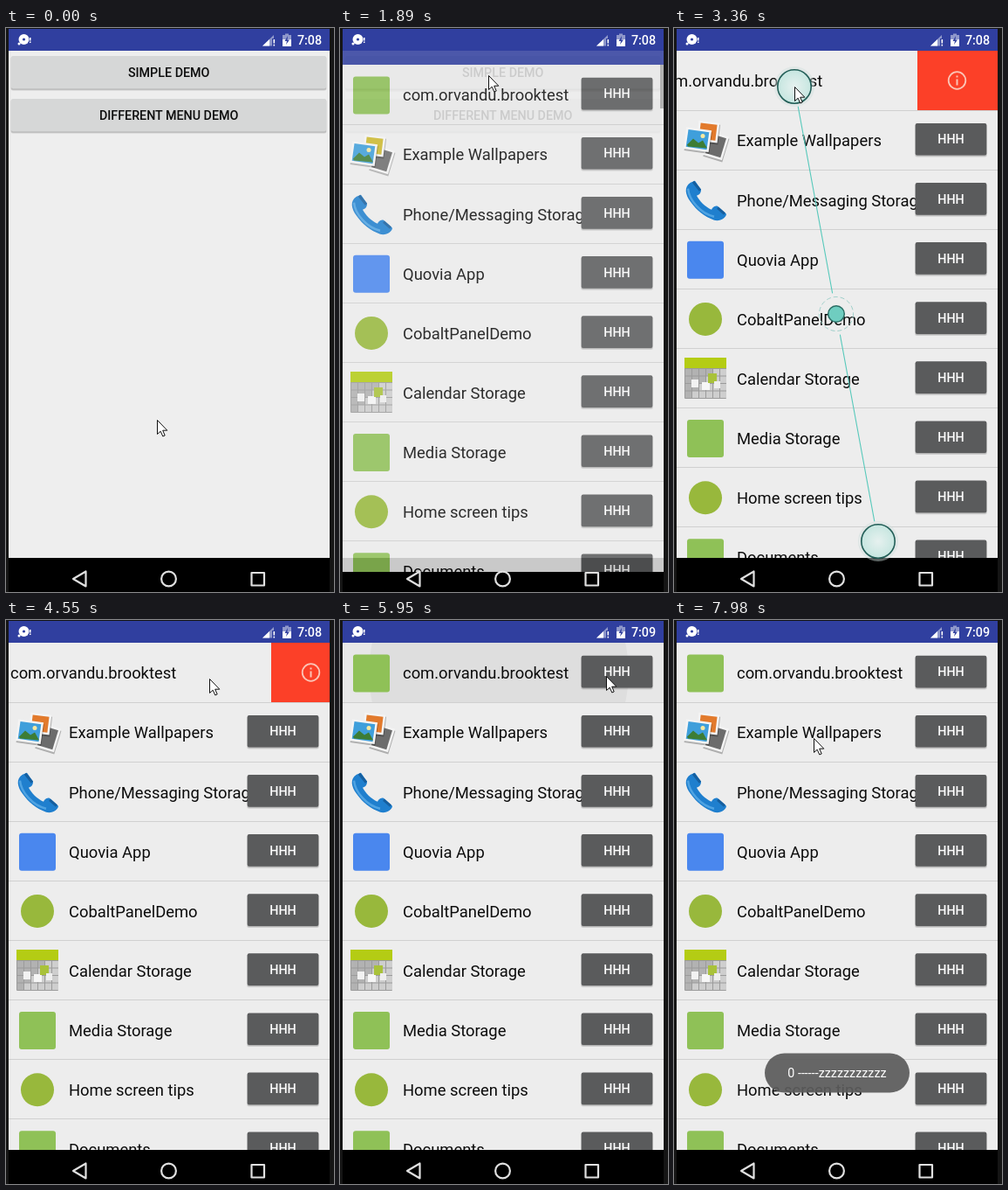
An HTML page that plays this animation: 376 by 645 pixels, repeating every 8000 ms.

```html
<!DOCTYPE html>
<html lang="en">
<head>
<meta charset="utf-8">
<title>Swipe menu demo</title>
<style>
  html, body { margin: 0; width: 100%; height: 100%; overflow: hidden; background: #151515; }
  svg { display: block; }
  text { font: 18.4px Roboto, sans-serif; fill: #0c0c0c; white-space: pre; }
  .label { font-size: 14.3px; font-weight: 500; text-anchor: middle; }
  .light { fill: #fff; }
</style>
</head>
<body>
<svg id="stage" width="376" height="645" viewBox="0 0 376 645"></svg>
<script>
const LOOP = 8000, STEP = 70, ROW = 68.1, MENU = 92;
const stage = document.getElementById('stage');

const rect = (x, y, w, h, fill, extra = '') =>
  `<rect x="${x}" y="${y}" width="${w}" height="${h}" fill="${fill}" ${extra}/>`;
const circle = (x, y, r, fill, extra = '') =>
  `<circle cx="${x}" cy="${y}" r="${r}" fill="${fill}" ${extra}/>`;
const path = (d, extra) => `<path d="${d}" ${extra}/>`;
const text = (x, y, s, cls = '') => `<text x="${x}" y="${y}" class="${cls}">${s}</text>`;
const group = (content, extra) => `<g ${extra}>${content}</g>`;

// Icons are drawn around their own centre.
const block = color => rect(-21, -21, 42, 43, color, 'rx="3"');
const disc = circle(0, 0, 19, '#98b83c');
const photo = (x, y, w, h, angle, fill, extra) => group(
  rect(-w / 2 + 1, -h / 2 + 2, w, h, '#0004') +
  rect(-w / 2, -h / 2, w, h, '#f4f4f4') +
  rect(-w / 2 + 2.5, -h / 2 + 2.5, w - 5, h - 5, fill, extra),
  `transform="translate(${x} ${y}) rotate(${angle})"`);
const wallpapers =
  photo(12, 6, 23, 28, 17, '#6c6c6c') +
  photo(3, -10, 24, 23, 7, '#e27a2c', 'id="backPhoto"') +
  photo(-9, -1, 29, 25, 8, '#3f9fdb') +
  path('M-21 5L-14 -2L-8 3L-3 0L2 9L-20 7Z', 'fill="#3d7d35"') +
  circle(-3, -5, 2.5, '#f6e9a0');
const handset =
  path('M-17 -20C-25 -15 -23 -6 -17 2C-10 12 -1 19 10 23C17 25 24 20 24 16L14 7C10 6 8 9 7 11' +
    'C0 8 -7 1 -10 -5C-7 -6 -5 -8 -5 -12L-12 -22Z', 'fill="#1f7fce"') +
  path('M-20 -13C-19 0 -5 16 10 19', 'fill="none" stroke="#4fa3e2" stroke-width="2.5"') +
  path('M-14 -21L-6 -11M14 9L22 16', 'fill="none" stroke="#165f9f" stroke-width="3"');
const calendar = (() => {
  let s = rect(-24, -24, 48, 47, '#9b9b9b', 'rx="1"') + rect(-24, -24, 48, 12, '#b4cc14');
  for (let i = 0; i < 24; i++)
    s += rect(-23 + (i % 6) * 8, -11 + Math.floor(i / 6) * 8.5, 7, 7.5, i % 6 + i / 6 < 4 ? '#b2b2b2' : '#cecece');
  return s + rect(-16, 1, 8, 9, '#f2f2f2') + rect(-4, 4, 9, 9, '#f6f6f6') +
    rect(3, -6, 10, 11, '#a9c23a') + rect(10, 3, 7, 8, '#eee');
})();

const apps = [
  ['com.orvandu.brooktest', block('#8fc157')],
  ['Example Wallpapers', wallpapers],
  ['Phone/Messaging Storage', handset],
  ['Quovia App', block('#4a87ee')],
  ['CobaltPanelDemo', disc],
  ['Calendar Storage', calendar],
  ['Media Storage', block('#8fc157')],
  ['Home screen tips', disc],
  ['Documents', block('#8fc157')]
];

const raised = (x, y, w, h, fill) =>
  rect(x - .5, y + .5, w + 1, h + 1.5, '#0002', 'rx="2.5"') +
  rect(x, y + 1, w, h, '#0002', 'rx="2"') + rect(x, y, w, h, fill, 'rx="2"');

const homeButton = (y, label) =>
  raised(6, y, 361, 37.5, '#d6d7d7') + text(186.7, y + 24, label, 'label');

const listRow = ([name, icon], i) => {
  const y = 26 + ROW * i;
  return group(
      group(icon, `transform="translate(36 ${y + 34.5})"`) + text(72, y + 41.3, name),
      `id="content${i}"`) +
    group(raised(276.7, y + 14.8, 81.6, 36.7, '#5a5b5c') +
      (i ? '' : rect(276.7, 40.8, 81.6, 36.7, '#fff', 'id="press" rx="2"')) +
      text(317.5, y + 38.3, 'HHH', 'label light'), `id="button${i}"`) +
    rect(3, Math.floor(y + ROW), 368, 1, '#d0d0d0');
};

const infoMenu = group(
  rect(0, 26, MENU, 68, '#fc4028') +
  circle(45.5, 60, 9.8, 'none', 'stroke="#fbc4b6" stroke-width="1.8"') +
  rect(44.5, 58.5, 2, 7, '#fbc4b6') + rect(44.5, 54.5, 2, 2, '#fbc4b6'), 'id="menu"');

const ripple =
  `<svg id="ripple" x="3" width="368" height="68">${rect(0, 0, 368, 68, '#000', 'opacity=".025"')}` +
  `${circle(179, 34, 0, '#000', 'id="wave" opacity=".04"')}</svg>`;

const statusIcons =
  circle(20.5, 13, 6, '#fff') + circle(20.5, 13, 1.6, '#303f9f') + circle(15, 18, 1.5, '#fff') +
  rect(27, 11, 1.5, 3.5, '#fff') + rect(27, 15.5, 1.5, 1.5, '#fff') +
  path('M307 8V12H305V20.5H294Z', 'fill="#8f98cb"') + path('M302 13V20.5H294Z', 'fill="#fff"') +
  rect(306.5, 13, 1.6, 4.5, '#fff') + rect(306.5, 18.7, 1.6, 1.8, '#fff') +
  rect(317, 8, 10, 5, '#8f98cb') + rect(317, 13, 10, 8, '#fff') + rect(320, 6.5, 4, 2, '#8f98cb') +
  path('M323 9L319.5 15H322L321 19L325 13.5H322.5Z', 'fill="#303f9f"') +
  `<text id="clock" x="348" y="19" class="label light"></text>`;

const navIcons = group(
  path('M91.5 621.5V638.5L77 630Z', '') + circle(186.5, 630, 8.4, 'none') +
  rect(281.5, 623, 14.5, 14.5, 'none'),
  'fill="none" stroke="#e0e0e0" stroke-width="2.2" stroke-linejoin="round"');

const touch = id => group(
  circle(0, 0, 21.5, 'none', 'stroke="#cfdedc" stroke-width="3" opacity=".45"') +
  circle(0, 0, 19.2, 'url(#glass)', 'stroke="#235f58" stroke-width="1.6"'), `id="${id}"`);

stage.innerHTML = `
  <defs>
    <clipPath id="screen">${rect(3, 1, 368, 605, '#000')}</clipPath>
    <radialGradient id="glass"><stop offset="0" stop-color="#e6f1ef"/><stop offset="1" stop-color="#c6e6e0"/></radialGradient>
  </defs>
  ${rect(3, 606, 368, 39, '#000')}
  ${rect(3, 1, 368, 25, '#303f9f')}
  ${rect(3, 26, 368, 580, '#eee')}
  ${rect(6, 34, 361, 39, '#000', 'id="lift" rx="2"')}
  ${homeButton(32, 'SIMPLE DEMO')}${homeButton(81, 'DIFFERENT MENU DEMO')}
  <g id="list"><g clip-path="url(#screen)">
    ${rect(3, 1, 368, 25, '#303f9f')}${rect(3, 26, 368, 580, '#ededed')}
    ${ripple}${apps.map(listRow).join('')}${infoMenu}
    ${rect(367, 26, 4, 50, '#a8a8a8', 'id="scrollbar"')}
  </g></g>
  ${statusIcons}${navIcons}
  <g id="toast">${rect(104, 495.5, 166, 45, '#5c5c5c', 'rx="22.5" opacity=".93"')}
    <text x="187" y="523" class="light" style="font-size:14.3px;text-anchor:middle">0 ------zzzzzzzzzzz</text></g>
  <g id="pinch">
    ${path('', 'id="link" stroke="#58c9bb" stroke-width="1.1"')}
    ${circle(186, 327, 19.5, 'none', 'stroke="#9fd0ca" stroke-dasharray="5 3"')}
    ${circle(186, 327, 9.3, '#6fcdc0', 'stroke="#2b6e65" stroke-width="1.5"')}
    ${touch('finger')}${touch('mirror')}
  </g>
  ${path('M.5 .5V16.5L4.2 13.2L6.8 19L9.2 18L6.7 12.2H11.8Z', 'id="cursor" fill="#fff" stroke="#111"')}`;

const el = {};
stage.querySelectorAll('[id]').forEach(node => el[node.id] = node);
const set = (name, attrs) => {
  for (const key in attrs) el[name].setAttribute(key, attrs[key]);
};
const clamp = (v, lo = 0, hi = 1) => Math.min(hi, Math.max(lo, v));
const ramp = (t, from, to) => clamp((t - from) / (to - from));
const move = (x, y) => ({ transform: `translate(${x} ${y})` });

// Pointer stops: time, x, y.
const stops = [
  [0, 173, 448], [210, 185, 133], [350, 185, 133], [490, 190, 133], [560, 190, 133],
  [910, 170, 54], [2240, 170, 54], [2590, 235, 98], [2870, 258, 67], [3080, 258, 67],
  [3360, 138, 67], [3570, 258, 67], [3850, 258, 67], [4200, 197, 67], [4340, 197, 67],
  [4550, 233, 67], [4760, 300, 80], [4900, 300, 118], [5250, 300, 118], [5600, 300, 140],
  [5670, 300, 140], [5880, 305, 64], [6860, 305, 64], [7350, 170, 114], [7560, 170, 114],
  [7980, 160, 135]
];
function pointerAt(t) {
  const i = Math.max(1, stops.findIndex(s => s[0] >= t));
  const [t0, x0, y0] = stops[i - 1], [t1, x1, y1] = stops[i];
  const p = ramp(t, t0, t1);
  return [Math.round(x0 + (x1 - x0) * p), Math.round(y0 + (y1 - y0) * p)];
}

function swipeAt(t, x) {
  if (t < 3080 || t >= 4900) return 0;
  if (t < 3360) return clamp(250 - x, 0, MENU);
  return t < 4410 ? MENU : clamp(300 - x, 0, MENU);
}

function drawPinch(t, x, y) {
  const mx = 372 - x, my = 654 - y, length = Math.hypot(186 - x, 327 - y);
  const at = d => `${x + (186 - x) * d / length} ${y + (327 - y) * d / length}`;
  set('pinch', { opacity: t >= 3010 && t < 3430 ? 1 : 0 });
  set('finger', move(x, y));
  set('mirror', move(mx, my));
  set('link', { d: `M${at(23)}L${at(length - 24)}M${at(length + 24)}L${at(2 * length - 23)}` });
}

function draw(t) {
  const [x, y] = pointerAt(t);
  set('cursor', move(x, y));
  drawPinch(t, x, y);

  set('lift', { opacity: 0.14 * ramp(t, 1190, 1400) });
  const rest = ((2100 - clamp(t, 1890, 2100)) / 210) ** 3;
  set('list', { ...move(0, 16 * rest), opacity: t < 1890 ? 0 : 1 - 0.15 * rest });
  set('scrollbar', { opacity: 1 - ramp(t, 2240, 2590) });
  set('backPhoto', { fill: t < 3010 ? '#cdb92d' : '#e27a2c' });

  const swipe = swipeAt(t, x);
  set('content0', move(-swipe, 0));
  set('button0', { opacity: clamp(1 - swipe / 50) });
  set('menu', move(371 - swipe, 0));

  const row = t < 5670 ? 1 : 0, start = row ? 5110 : 5740;
  set('ripple', { y: 26 + ROW * row, opacity: t < start ? 0 : 1 - ramp(t, start + 280, start + 420) });
  set('wave', { r: 149 * Math.max(0, t - start) / 210 });

  set('press', { opacity: t >= 6510 ? 0.1 * (1 - ramp(t, 6580, 6860)) : 0 });
  set('toast', { opacity: ramp(t, 6580, 6860) });
  el.clock.textContent = t < 5320 ? '7:08' : '7:09';
}

function frame() {
  const t = performance.now() % LOOP;
  draw(Math.floor(t / STEP) * STEP);
  requestAnimationFrame(frame);
}
frame();
</script>
</body>
</html>
```
